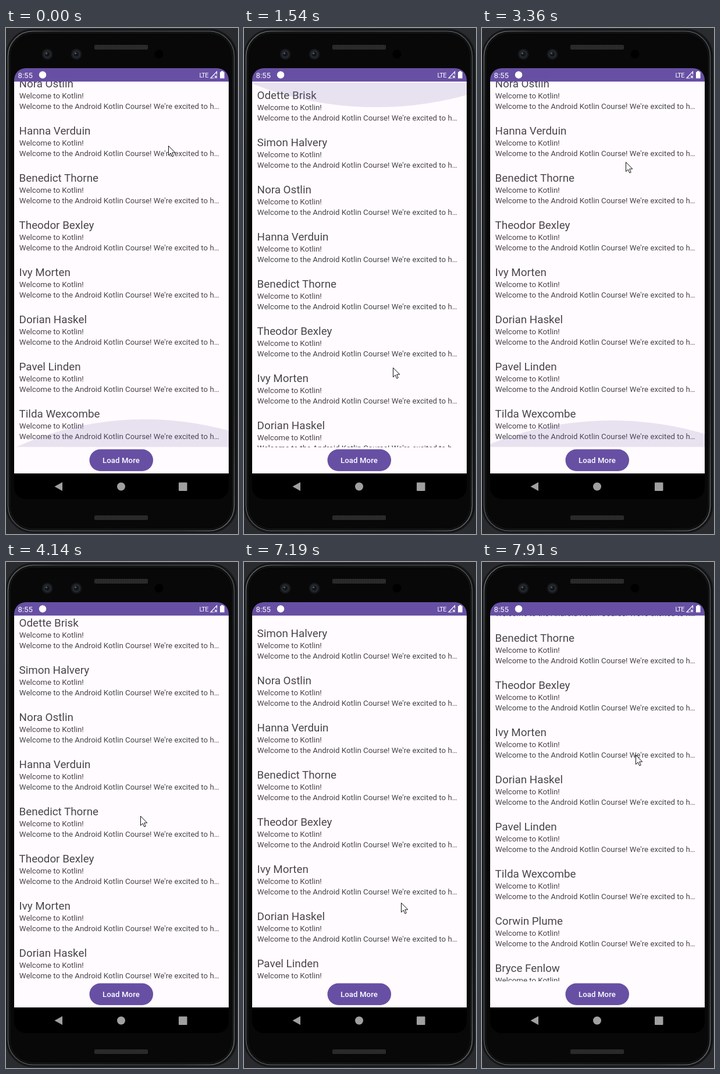
Animation of 399x869 px, one loop 8 s. Source, as an HTML page:

```html
<!DOCTYPE html>
<html lang="en">
<head>
<meta charset="utf-8">
<title>Message list</title>
<style>
html, body { margin: 0; width: 100%; height: 100%; overflow: hidden; background: #292b2f; }
svg { display: block; width: 399px; height: 869px; }
text { font-family: Roboto, Arial, sans-serif; fill: #48454c; }
.name { font-size: 18.8px; }
.line { font-size: 13.3px; }
.status text { font-size: 13.2px; fill: #fff; }
.status .net { font-size: 11px; letter-spacing: -.6px; }
.label { font-size: 13.2px; font-weight: 500; letter-spacing: .08px; fill: #fff; text-anchor: middle; }
.glow { fill: #6750a4; }
.nav { fill: #a0a0a0; }
</style>
</head>
<body>
<svg viewBox="0 0 399 869">
  <defs>
    <linearGradient id="rim" x2="1" y2="1">
      <stop offset="0" stop-color="#5c6063"/>
      <stop offset=".12" stop-color="#3a3d40"/>
      <stop offset=".5" stop-color="#46494c"/>
      <stop offset=".88" stop-color="#3a3d40"/>
      <stop offset="1" stop-color="#5c6063"/>
    </linearGradient>
    <pattern id="mesh" width="3" height="3" patternUnits="userSpaceOnUse">
      <rect width="3" height="3" fill="#151515"/>
      <path d="M0 0L3 3M3 0L0 3" stroke="#484848" stroke-width=".7"/>
    </pattern>
    <clipPath id="screen"><rect x="14" y="69" width="369" height="740" rx="20"/></clipPath>
    <clipPath id="view"><rect x="14" y="92" width="369" height="628"/></clipPath>
    <clipPath id="glowArea"><rect x="14" y="94" width="369" height="625.5"/></clipPath>
    <g id="camera">
      <circle r="9.5" fill="#15171a"/>
      <circle r="7" fill="#24282c"/>
      <circle r="4" fill="#111418"/>
      <circle cx="-1.5" cy="-1.5" r="1.8" fill="#4a5158"/>
    </g>
  </defs>

  <rect width="399" height="869" fill="#292b2f"/>
  <rect x=".5" y="2.5" width="396" height="864" rx="46" fill="#101112" stroke="#17181a" stroke-width="2"/>
  <rect x="3.5" y="5.5" width="389" height="858" rx="43" fill="#070707" stroke="url(#rim)" stroke-width="2"/>
  <rect x="6.5" y="8.5" width="383" height="852" rx="40" fill="#080808" stroke="#1d1f20"/>

  <use href="#camera" x="71" y="45"/>
  <use href="#camera" x="121" y="45"/>
  <circle cx="263" cy="45" r="7.5" fill="#000"/>
  <rect x="152" y="29" width="92" height="8" rx="2" fill="url(#mesh)"/>
  <rect x="152" y="837" width="92" height="8" rx="2" fill="url(#mesh)"/>

  <g clip-path="url(#screen)">
    <rect x="14" y="69" width="369" height="740" fill="#000"/>
    <rect x="14" y="92" width="369" height="673" fill="#fffbfe"/>
    <rect x="14" y="69" width="369" height="23" fill="#6750a4"/>
  </g>

  <g class="status">
    <text x="20.5" y="85.5">8:55</text>
    <circle cx="63" cy="80.5" r="6.2" fill="#fff"/>
    <text class="net" x="332.5" y="84.5">LTE</text>
    <path d="M362.5 80V75L352 86h5.5M359 82l4 4m0-4l-4 4" fill="none" stroke="#fff" stroke-width="1.2"/>
    <path d="M370 74h3.6v1.4h2v11.2h-7.6V75.400h2z" fill="#fff"/>
  </g>

  <g clip-path="url(#view)"><g id="list"></g></g>
  <g clip-path="url(#glowArea)">
    <ellipse id="topGlow" class="glow" rx="443"/>
    <ellipse id="endGlow" class="glow" rx="443"/>
  </g>

  <rect id="button" x="143.500" y="723.500" width="109.500" height="37.500" rx="18.750"/>
  <text class="label" x="198" y="747">Load More</text>

  <g class="nav">
    <path d="M83.500 787.500L97 780v15z"/>
    <circle cx="198" cy="787.500" r="7"/>
    <rect x="297" y="780.500" width="14.500" height="14.500" rx="1"/>
  </g>

  <path id="cursor" d="M.5 .5V16.500L4.200 13 6.800 18.800 9.200 17.800 6.700 12H11.800Z" fill="#fff" stroke="#111" stroke-width="1"/>
</svg>
<script>
const LOOP = 8000, PITCH = 81;
const names = ["Odette Brisk", "Simon Halvery", "Nora Ostlin", "Hanna Verduin", "Benedict Thorne",
  "Theodor Bexley", "Ivy Morten", "Dorian Haskel", "Pavel Linden", "Tilda Wexcombe",
  "Corwin Plume", "Bryce Fenlow"];
const subject = "Welcome to Kotlin!";
const preview = "Welcome to the Android Kotlin Course! We're excited to h…";
const $ = id => document.getElementById(id);

const ticks = [0, 150, 300, 420, 570, 690, 840, 990, 1140,
  1260, 1410, 1530, 1680, 1800, 1950, 2090, 2210,
  2330, 2450, 2570, 2690, 2820, 2950, 3080,
  3360, 3480, 3610, 3740, 3870, 4010, 4140, 4290,
  4410, 4550, 4700, 4850, 4990, 5140, 5280, 5430, 5580,
  5980, 6130, 6290, 6450, 6610, 6760, 6920,
  7060, 7190, 7310, 7430, 7550, 7670, 7790, 7910];

// Tracks hold [time, value...] keys with linear motion between them.
const scroll = [[0, -67], [690, -67], [840, -14], [1140, 115], [2210, 115], [2330, 106], [2450, 66],
  [2690, -67], [3610, -67], [3870, 0], [4140, 104], [4290, 115], [6920, 115], [7060, 92],
  [7190, 41], [7910, -194]];
const pointer = [[0, 279, 202], [150, 277, 206], [570, 252, 238], [690, 248, 258], [840, 246, 300],
  [1140, 248, 435], [1410, 255, 560], [1680, 258, 612], [2210, 260, 622], [2330, 260, 598],
  [2450, 260, 541], [2690, 258, 400], [2950, 252, 265], [3080, 250, 226], [3360, 247, 230],
  [3610, 240, 262], [3870, 234, 330], [4140, 231, 436], [4290, 228, 500], [4550, 219, 615],
  [4850, 209, 698], [5140, 204, 730], [5430, 203, 737], [5580, 203, 737], [5980, 207, 733],
  [6450, 244, 699], [6920, 270, 665], [7060, 270, 635], [7190, 270, 585], [7910, 264, 331]];
const topHeight = [[1140, 0], [1260, 22], [1410, 42], [1530, 44], [2090, 0],
  [4290, 0], [4410, 24], [4550, 42], [4700, 42], [5280, 0]];
const endHeight = [[0, 48], [150, 46], [690, 0], [2690, 0], [2820, 24], [3080, 48], [3360, 46], [3870, 0]];

function at(track, t) {
  const i = track.findIndex(key => key[0] > t);
  if (i < 0) return track[track.length - 1].slice(1);
  if (i === 0) return track[0].slice(1);
  const a = track[i - 1], b = track[i], k = (t - a[0]) / (b[0] - a[0]);
  return a.slice(1).map((v, n) => v + (b[n + 1] - v) * k);
}

function addText(cls, x, y, str) {
  const el = document.createElementNS("http://www.w3.org/2000/svg", "text");
  el.setAttribute("class", cls);
  el.setAttribute("x", x);
  el.setAttribute("y", y);
  el.textContent = str;
  $("list").append(el);
}

function setGlow(el, edge, dir, height, x) {
  const ry = 443 * height / 59.3;
  el.setAttribute("cx", 198.5 + (x - 198.5) / 2);
  el.setAttribute("cy", edge + dir * (height - ry));
  el.setAttribute("ry", ry);
  el.setAttribute("opacity", .15 * Math.min(1, height / 25));
}

function render(t) {
  const [x, y] = at(pointer, t);
  $("list").setAttribute("transform", `translate(0 ${Math.round(at(scroll, t)[0])})`);
  $("cursor").setAttribute("transform", `translate(${Math.round(x)} ${Math.round(y)})`);
  setGlow($("topGlow"), 92, 1, at(topHeight, t)[0], x);
  setGlow($("endGlow"), 720, -1, at(endHeight, t)[0], x);
  $("button").setAttribute("fill", t >= 5580 && t < 7060 ? "#8f7ebd" : "#6750a4");
}

function frame(now) {
  const t = now % LOOP;
  render(ticks.filter(tick => tick <= t).pop() || 0);
  requestAnimationFrame(frame);
}

names.forEach((name, i) => {
  const y = i * PITCH;
  addText("name", 22.6, y + 7, name);
  addText("line", 22.8, y + 26, subject);
  addText("line", 22.8, y + 44, preview);
});
render(0);
requestAnimationFrame(frame);
</script>
</body>
</html>
```
